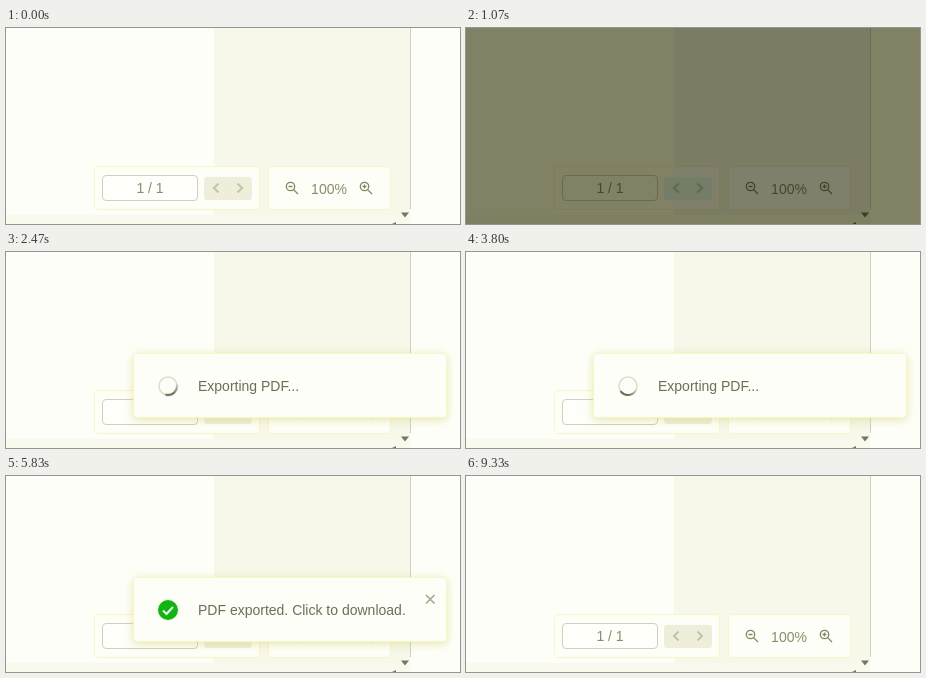
Recreate the animation shown at these times as an HTML page. Size 454 px wide and 196 px high, loop 9360 ms.

```html
<!DOCTYPE html>
<html lang="en">
<head>
<meta charset="utf-8">
<title>PDF export</title>
<style>
  html, body { margin: 0; width: 100%; height: 100%; overflow: hidden; background: #fefef8; }
  svg { display: block; width: 454px; height: 196px; }
  text { font: 14px "Liberation Sans", Arial, sans-serif; fill: #8c8c68; }
  .toast text { fill: #6e6e54; }
  .card { fill: #fefef9; stroke: #f7f7c0; }
  .line { fill: none; stroke: #85855f; stroke-width: 1.3; }
  .panel { filter: drop-shadow(0 2px 5px rgba(205, 205, 90, .45)); }
  .shade { mix-blend-mode: multiply; }
  .toast, .shade, #cursor { opacity: 0; }
  #spinner { transform-origin: 162px 134px; }
</style>
</head>
<body>
<svg viewBox="0 0 454 196">
  <defs>
    <g id="lens" class="line">
      <circle cx="-1.5" cy="-1.5" r="4.2"/>
      <path d="M1.6 1.6L6 6M-3.5-1.5h4"/>
    </g>
    <rect id="panel" class="card panel" x="127.5" y="101.5" width="313" height="64" rx="3"/>
  </defs>

  <rect width="454" height="196" fill="#fefef8"/>
  <rect x="208" width="196" height="187" fill="#f7f7ea"/>
  <rect y="187" width="404" height="9" fill="#f9f9ee"/>
  <path d="M404.5 0V181" stroke="#d0d0bc"/>
  <path d="M395 184.5h8l-4 5zM386 196l4-2v2z" fill="#77775f"/>

  <rect class="card" x="88.5" y="138.5" width="165" height="43" rx="3"/>
  <rect class="card" x="262.5" y="138.5" width="122" height="43" rx="3"/>
  <rect x="96.5" y="147.5" width="95" height="25" rx="3.5" fill="#fefefa" stroke="#d0d0bc"/>
  <text x="144" y="165" text-anchor="middle">1 / 1</text>
  <rect x="198" y="149" width="48" height="23" rx="3" fill="#eeeedb"/>
  <path d="M212.5 155.5L208 160l4.5 4.5M231.5 155.5L236 160l-4.5 4.5" fill="none" stroke="#c4c4a6" stroke-width="2"/>
  <use href="#lens" x="286" y="160"/>
  <use href="#lens" x="360" y="160"/>
  <path class="line" d="M358.5 156.5v4"/>
  <text x="323" y="166" text-anchor="middle">100%</text>

  <g class="shade" id="shade">
    <rect width="454" height="196" fill="#828268"/>
    <rect x="208" width="196" height="187" fill="#80806e"/>
    <rect x="198" y="149" width="48" height="23" fill="#7c8678"/>
  </g>

  <g class="toast" id="busy">
    <use href="#panel"/>
    <circle cx="162" cy="134" r="9" fill="none" stroke="#dedec2" stroke-width="1.5"/>
    <g id="spinner"></g>
    <text x="192" y="139">Exporting PDF...</text>
  </g>

  <g class="toast" id="done">
    <use href="#panel"/>
    <circle cx="162" cy="134" r="10" fill="#0cb80c"/>
    <path d="M157 134.5l3.5 3.5 6.5-7" fill="none" stroke="#fff" stroke-width="2"/>
    <text x="192" y="139">PDF exported. Click to download.</text>
    <path d="M420 119l8.5 8.5m0-8.5l-8.5 8.5" stroke="#a9a992" stroke-width="1.7"/>
  </g>

  <g id="cursor">
    <path d="M.5 .5v16l3.7-3.5 2.6 6 2.7-1.2-2.6-5.8H12z" fill="#fff" stroke="#222218"/>
  </g>
</svg>
<script>
const LOOP = 9360;
const $ = id => document.getElementById(id);

// Spinner arc: short pieces that grow darker towards the head.
const PIECES = 12, RADIUS = 9;
const point = deg => {
  const a = deg * Math.PI / 180;
  return `${162 + RADIUS * Math.cos(a)} ${134 + RADIUS * Math.sin(a)}`;
};
for (let i = 0; i < PIECES; i++) {
  const piece = document.createElementNS("http://www.w3.org/2000/svg", "path");
  const from = -65 + i * 10;
  piece.setAttribute("d", `M${point(from)}A${RADIUS} ${RADIUS} 0 0 1 ${point(from + 11)}`);
  piece.setAttribute("fill", "none");
  piece.setAttribute("stroke", "#62624a");
  piece.setAttribute("stroke-width", "2");
  piece.setAttribute("opacity", Math.min(1, (i + 1) / 7));
  $("spinner").append(piece);
}

const start = document.timeline.currentTime || 0;
function play(id, frames) {
  const anim = $(id).animate(frames, { duration: LOOP, iterations: Infinity });
  anim.startTime = start;
}
const fade = (id, steps) => play(id, [[0, 0], ...steps, [LOOP, 0]].map(
  ([time, opacity]) => ({ offset: time / LOOP, opacity })));

fade("shade", [[700, 0], [920, 1], [1350, 1], [1600, 0]]);
fade("busy", [[1600, 0], [1850, 1], [4150, 1], [4350, 0]]);
fade("done", [[4200, 0], [4400, 1], [6850, 1], [7100, 0]]);
fade("cursor", [[6000, 0], [6000, 1], [8100, 1], [8100, 0]]);

const turn = time => `rotate(${50 + (time - 2470) * 0.3}deg)`;
play("spinner", [{ transform: turn(0) }, { transform: turn(LOOP) }]);

const at = (time, x, y) => ({
  offset: time / LOOP, transform: `translate(${x}px, ${y}px)`, easing: "ease-in-out"
});
play("cursor", [at(0, 348, 57), at(6000, 348, 57), at(6550, 287, 130), at(LOOP, 287, 130)]);
</script>
</body>
</html>
```
